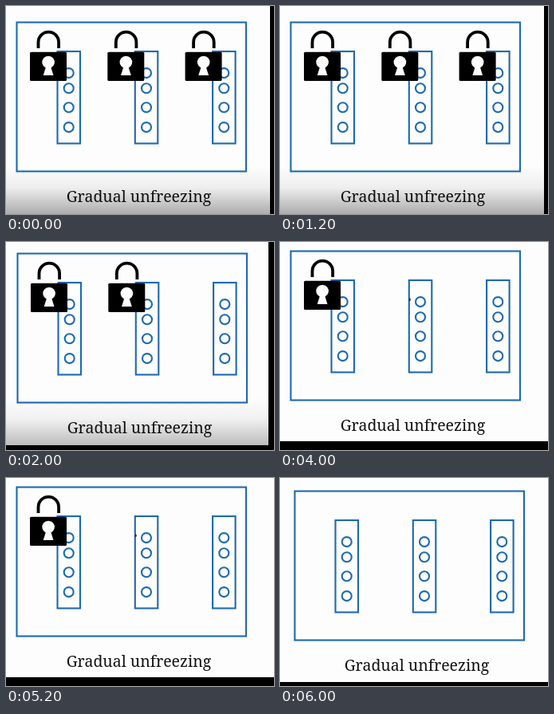
These frames come from a looping animation (336 by 261 pixels, 8000 ms). An HTML page:

```html
<!DOCTYPE html>
<html>
<head>
<meta charset="utf-8">
<style>
html, body { margin: 0; width: 100%; height: 100%; overflow: hidden; background: #000; }
svg { display: block; width: 100vw; height: 100vh; }
.line { fill: none; stroke: #1d69b0; stroke-width: 2.1; }
text { font: 19.5px "Noto Serif", serif; text-anchor: middle; fill: #111; }
</style>
</head>
<body>
<svg viewBox="0 0 336 261">
  <defs>
    <linearGradient id="fade" x1="0" y1="0" x2="0" y2="1">
      <stop offset="0" stop-opacity="0"/>
      <stop offset=".45" stop-opacity=".06"/>
      <stop offset="1" stop-opacity=".32"/>
    </linearGradient>
    <g id="layer" class="line">
      <rect x="51" y="36.5" width="28.5" height="115.5"/>
      <circle cx="65.2" cy="63.6" r="6"/>
      <circle cx="65.2" cy="82.7" r="6"/>
      <circle cx="65.2" cy="106.7" r="6"/>
      <circle cx="65.2" cy="131.6" r="6"/>
    </g>
    <g id="lock">
      <path d="M27 32.5V25a12.8 12.8 0 0 1 25.6 0V32.5" fill="none" stroke="#000" stroke-width="3.8"/>
      <rect x="16.5" y="37.3" width="46" height="36.2" rx="1.5"/>
      <path d="M36.2 57L33.2 66.5H46L43 57A7.8 7.8 0 1 0 36.2 57Z" fill="#fdfdfd"/>
    </g>
  </defs>
  <rect width="336" height="261"/>
  <rect id="paper" fill="#fdfdfd"/>
  <g id="slide">
    <rect class="line" width="287.5" height="187"/>
    <text x="153" y="225.5">Gradual unfreezing</text>
  </g>
  <ellipse id="speck" cx="162.7" cy="72.3" rx="1" ry="2" fill="#3a2028"/>
  <rect id="shade" height="60" fill="url(#fade)"/>
</svg>
<script>
const $ = id => document.getElementById(id);
const HOLD = 2000, GAP = 97.3;
// slide position, visible paper size, bottom shading
const steps = [
  { x: 13.5, y: 20.5, w: 331, h: 261, shade: 1 },
  { x: 14.5, y: 14.5, w: 329, h: 255, shade: 0.8 },
  { x: 13.5, y: 11.5, w: 336, h: 250, shade: 0 },
  { x: 18.5, y: 16.5, w: 336, h: 256, shade: 0 }
];

function set(el, attrs) {
  for (const k in attrs) el.setAttribute(k, attrs[k]);
}

function place(id, i) {
  const el = document.createElementNS("http://www.w3.org/2000/svg", "use");
  set(el, { href: "#" + id, x: i * GAP });
  $("slide").append(el);
  return el;
}

const columns = [0, 1, 2];
columns.forEach(i => place("layer", i));
const locks = columns.map(i => place("lock", i));

function draw(now) {
  const n = Math.floor(now / HOLD) % steps.length;
  const s = steps[n];
  set($("paper"), { width: s.w, height: s.h });
  set($("shade"), { y: s.h - 60, width: s.w, opacity: s.shade });
  set($("slide"), { transform: `translate(${s.x} ${s.y})` });
  set($("speck"), { opacity: n === 2 ? 1 : 0 });
  locks.forEach((lock, i) => set(lock, { opacity: i < 3 - n ? 1 : 0 }));
}

const start = performance.now();
function tick() {
  draw(performance.now() - start);
  requestAnimationFrame(tick);
}
tick();
</script>
</body>
</html>
```
